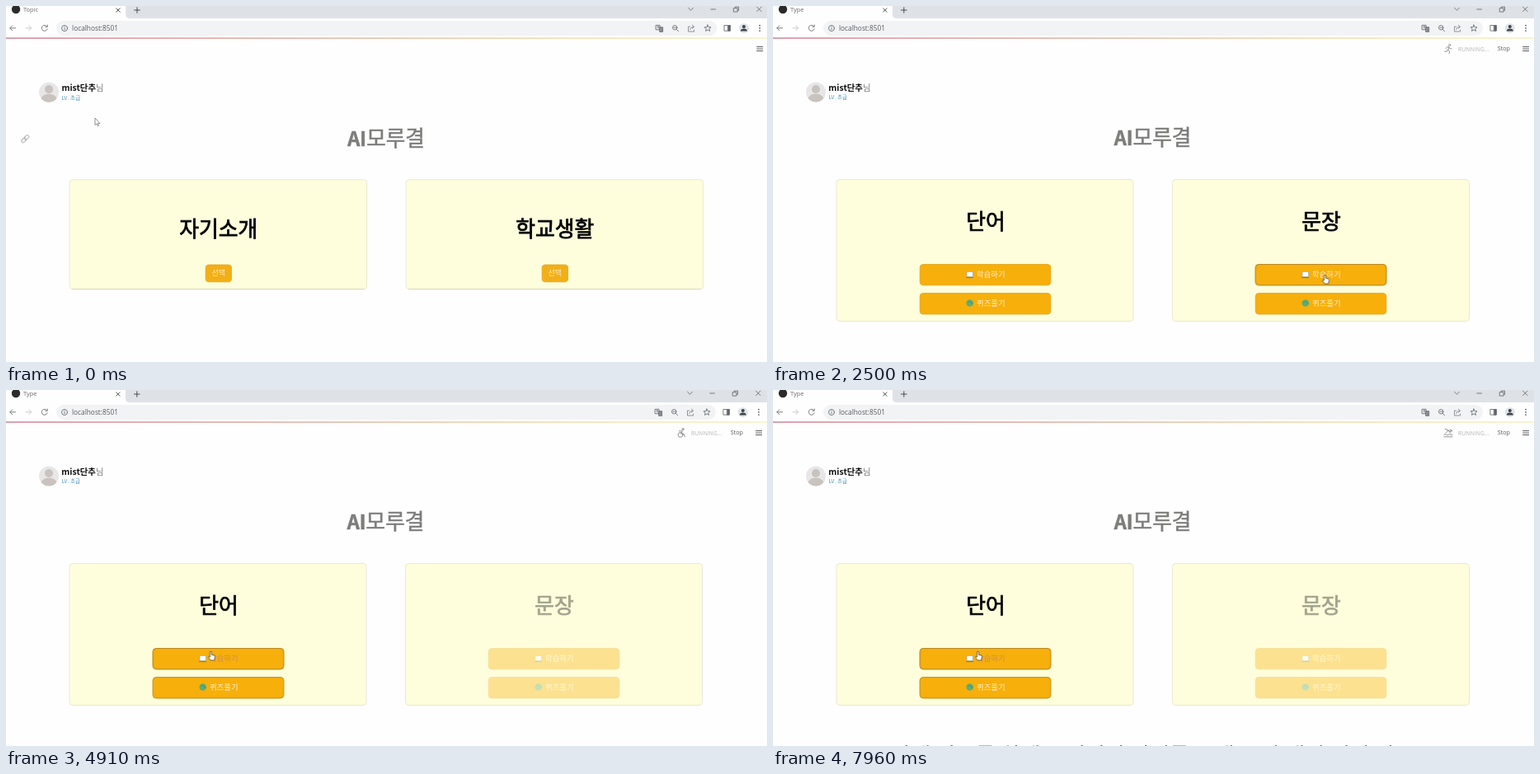
Write an HTML page that moves like this. It is 923 px wide and 432 px high and loops after 8 s.

```html
<!DOCTYPE html>
<html lang="ko">
<head>
<meta charset="utf-8">
<title>Topic</title>
<style>
html, body { margin: 0; width: 100%; height: 100%; overflow: hidden; background: #fefefe; }
svg { display: block; }
text { font-family: "Noto Sans CJK KR", "Noto Sans CJK", "Noto Sans", sans-serif; }
.ui { font-family: "Open Sans", "Noto Sans", sans-serif; }
.mid { text-anchor: middle; }
.head { font-size: 25.8px; text-anchor: middle; stroke: #000; stroke-width: .75; }
.line { fill: none; stroke: #6c7075; stroke-width: .9; stroke-linecap: round; stroke-linejoin: round; }
.card { fill: #fffedc; stroke: #e8e8d4; stroke-width: 1; }
.pick { fill: #f1af18; stroke: #e3a526; stroke-width: .8; }
.btn { fill: #f7af0b; stroke: #e2a31c; stroke-width: .8; }
.hover { fill: none; stroke: #b0842a; stroke-width: .9; }
.label { fill: currentColor; font-size: 9.4px; }
.light { color: #fff0cc; }

/* one loop = 8s, 1% = 80ms */
.t { animation: 8s linear infinite; }
.flip { animation-timing-function: step-end; }
#view { animation-name: settle; }
.topic { animation-name: topic; }
.type { animation-name: type; }
.tabA { animation-name: tabA; }
.tabB { animation-name: tabB; }
.link { animation-name: link; }
.run { animation-name: run; }
.overR { animation-name: overR; }
.overL { animation-name: overL; }
.busy { animation-name: busy; }
.press { animation-name: press; }
.stale { animation-name: stale; }
.next { animation-name: next; }
#cursor { animation-name: move; }
.arrow { animation-name: arrow; }
.hand { animation-name: hand; }
.reel { animation: reel 1.6s steps(8) infinite; }

@keyframes settle { 0% { transform: scale(1.0013); } 6.75%, 100% { transform: none; } }
@keyframes topic { 0% { opacity: 1; } 31.2%, 100% { opacity: 0; } }
@keyframes type { 0% { opacity: 0; } 31.2%, 100% { opacity: 1; } }
@keyframes tabA { 0% { opacity: 1; } 28%, 100% { opacity: 0; } }
@keyframes tabB { 0% { opacity: 0; } 28%, 100% { opacity: 1; } }
@keyframes link { 0% { opacity: 1; } 1.6%, 100% { opacity: 0; } }
@keyframes run { 0%, 38.1% { opacity: 0; } 23.75%, 55.4%, 100% { opacity: 1; } }
@keyframes overR { 0%, 40%, 100% { opacity: 0; } 23.1% { opacity: 1; } }
@keyframes overL { 0% { opacity: 0; } 42.5%, 100% { opacity: 1; } }
@keyframes busy { 0% { opacity: 0; } 56%, 100% { opacity: .7; } }
@keyframes press { 0%, 56% { color: #fff0cc; } 59%, 100% { color: #d08d48; } }
@keyframes stale { 0%, 56% { opacity: 1; } 60.5%, 100% { opacity: .36; } }
@keyframes next { 0% { opacity: 0; } 96.25%, 100% { opacity: 1; } }
@keyframes arrow { 0%, 40% { opacity: 1; } 23.1%, 42.5%, 100% { opacity: 0; } }
@keyframes hand { 0%, 40% { opacity: 0; } 23.1%, 42.5%, 100% { opacity: 1; } }
@keyframes reel { to { transform: translateX(-96px); } }
@keyframes move {
  0%, .75% { transform: translate(108px, 136px); }
  2.5%, 5.6% { transform: translate(708px, 203px); }
  9.25%, 10.8% { transform: translate(690px, 300px); }
  17.5%, 20.9% { transform: translate(618px, 311px); }
  23.75% { transform: translate(669.5px, 326px); }
  38% { transform: translate(669.5px, 326px); animation-timing-function: ease-in-out; }
  44.25%, 100% { transform: translate(248.5px, 317px); }
}
</style>
</head>
<body>
<svg width="923" height="432" viewBox="0 0 923 432">
  <defs>
    <linearGradient id="bar">
      <stop offset="0" stop-color="#c4647a"/>
      <stop offset=".4" stop-color="#dc9c88"/>
      <stop offset=".75" stop-color="#efd59a"/>
      <stop offset="1" stop-color="#f4ecb8"/>
    </linearGradient>
    <clipPath id="face"><circle cx="52" cy="104.5" r="12"/></clipPath>

    <g id="select">
      <rect class="pick" x="-15.7" y="313.6" width="31.4" height="20.8" rx="4"/>
      <text class="mid" y="326.3" font-size="9" fill="#fdeabb">선택</text>
    </g>
    <g id="learn">
      <rect class="btn" x="-79.3" y="313.5" width="158.6" height="25.3" rx="4"/>
      <path d="M-22.5 322.5h7.4v6h-7.4z" fill="#fff" stroke="#8ea3ad" stroke-width=".6"/>
      <path d="M-23.3 329.6h9" stroke="#6f7a80" stroke-width="1"/>
      <text class="label" x="-10.5" y="328.6">학습하기</text>
    </g>
    <g id="quiz">
      <rect class="btn" x="-79.3" y="348.5" width="158.6" height="25.5" rx="4"/>
      <circle cx="-18.8" cy="360.5" r="4.3" fill="#5fae72"/>
      <path d="M-21 359.5q2-2 4 0t1 2.6" fill="none" stroke="#3f8f86" stroke-width="1"/>
      <text class="label" x="-10.5" y="363.6">퀴즈풀기</text>
    </g>
    <rect id="ring" class="hover" x="-79.3" y="313.5" width="158.6" height="25.3" rx="4"/>

    <g id="wheel"><circle cx="8" cy="1.6" r="1.1"/><circle cx="5" cy="8.4" r="2.9"/><path d="M3.5 3.7 7.4 3.9 5.6 7H9l1.5 3.8"/></g>
    <g id="bike"><circle cx="7.6" cy="1.5" r="1.1"/><circle cx="3" cy="9" r="2.2"/><circle cx="9.2" cy="9" r="2.2"/><path d="M9.6 5.2H8L6.3 3.5 4.2 5.6 6.2 7V9.4"/></g>
    <g id="person"><circle cx="6" cy="1.4" r="1.1"/><path d="M1.4 4h9.2M4.8 4v7.5M7.2 4v7.5M4.8 7.5h2.4"/></g>
    <g id="runner"><circle cx="7.6" cy="1.5" r="1.1"/><path d="M3 5.4 5.2 3.6 7 4 5.6 7.2 7.6 8.8 7.2 11.5M5.6 7.2 4.4 9.2 1.6 9.2M7 4 8.2 5.8H10.2"/></g>
    <g id="swim"><circle cx="9" cy="3.4" r="1.2"/><path d="M2.4 1.4 6 2.8 3.2 6.2M6 2.8 8.6 6.4M.8 8.2q1.3-1 2.6 0t2.6 0 2.6 0 2.6 0M.8 10.8h10.4"/></g>
  </defs>

  <rect width="923" height="432" fill="#fefefe"/>
  <g id="view" class="t flip">
    <!-- tab strip -->
    <path d="M923 0V15H150q-5 0-5-5V0z" fill="#dee1e6"/>
    <circle cx="12" cy="4" r="5.2" fill="#2b2b2b"/>
    <g font-size="7.4" fill="#6a6a6a">
      <text class="ui t flip tabA" x="21" y="7.4">Topic</text>
      <text class="ui t flip tabB" x="21" y="7.4">Type</text>
    </g>
    <g class="line">
      <path d="M133.6 2.8l4.4 4.4m0-4.4-4.4 4.4M155.5 5h6.6M158.8 1.7v6.6" stroke="#3c4043"/>
      <path d="M826.5 2.2l3 3 3-3M853.8 4h5.6M909.6 1.2l5.4 5.4m0-5.4-5.4 5.4"/>
      <path d="M881.6 2.7h4.4v4.4h-4.4zM883.2 2.4V1.1h4.3v4.4h-1.2"/>
    </g>

    <!-- toolbar -->
    <rect x="61" y="18" width="800" height="18" rx="9" fill="#f1f3f4"/>
    <g class="line">
      <path d="M11.5 26.8H4.8m3-3-3 3 3 3"/>
      <path d="M24 26.8h6.7m-3-3 3 3-3 3" stroke="#c4c6c9"/>
      <path d="M49.6 24.7a3.5 3.5 0 1 0 .5 3.2M50.2 23v2.3h-2.4"/>
      <circle cx="71" cy="27" r="3.5"/>
      <path d="M71 26.7v1.9M71 25v.1"/>
      <path d="M787.5 23.3h4.6v5.4h-4.6zM789 25h1.8m-.9 0v2"/>
      <path d="M792 25.700h3.600v5.600h-3.600z" fill="#8a8e92"/>
      <circle cx="810.2" cy="26.2" r="2.7"/><path d="M812.3 28.4l2.3 2.3M809 26.2h2.4"/>
      <path d="M828.5 25h-2v6h7v-2M828.6 28.5q.6-3.2 4-3.3M831.3 23.2l2.4 2-2.4 2" stroke="#85898e"/>
      <path d="M850 23l1.1 2.6 2.9.2-2.2 1.8.7 2.8-2.5-1.5-2.5 1.5.7-2.8-2.2-1.8 2.9-.2z"/>
      <path d="M870.3 23.5h7v6.6h-7z"/><path d="M874.7 23.5h2.6v6.6h-2.6z" fill="#5f6368"/>
    </g>
    <text class="ui" x="80" y="29.8" font-size="8.3" fill="#5a5d61">localhost:8501</text>
    <circle cx="893.8" cy="27" r="6" fill="#dfe3ea"/>
    <circle cx="893.8" cy="25" r="2" fill="#3f4347"/>
    <path d="M889.8 30.5q0-3 4-3t4 3z" fill="#3f4347"/>
    <g fill="#5f6368"><circle cx="913" cy="23.7" r=".9"/><circle cx="913" cy="26.9" r=".9"/><circle cx="913" cy="30.1" r=".9"/></g>
    <rect y="38.4" width="923" height="1.2" fill="url(#bar)"/>

    <!-- page header -->
    <path d="M909.2 49.5h7.8m-7.8 2.5h7.8m-7.8 2.5h7.8" stroke="#5c5e65" stroke-width="1"/>
    <g class="t flip run">
      <svg x="813" y="46" width="12" height="12">
        <g class="reel line" style="stroke:#85868a">
          <use href="#wheel"/>
          <use href="#bike" x="12"/>
          <use href="#person" x="24"/>
          <use href="#swim" x="36"/>
          <use href="#runner" x="48"/>
          <use href="#bike" x="60"/>
          <use href="#person" x="72"/>
          <use href="#swim" x="84"/>
        </g>
      </svg>
      <text class="ui" x="831" y="54.6" font-size="6.9" fill="#b4b5b9">RUNNING...</text>
      <text class="ui" x="878.7" y="54.4" font-size="7.2" fill="#55575f">Stop</text>
    </g>
    <circle cx="52" cy="104.5" r="12" fill="#e8e6e6"/>
    <g clip-path="url(#face)" fill="#c8c3bf">
      <circle cx="52" cy="101" r="5"/>
      <ellipse cx="52" cy="114" rx="10" ry="7.5"/>
    </g>
    <text x="67.3" y="103.3" font-size="10.4" fill="#777"><tspan font-weight="700" fill="#111">mist단추</tspan>님</text>
    <text x="67.5" y="113.4" font-size="6.6" fill="#4f93ba">LV. 초급</text>
    <g class="line t flip link" style="stroke:#9c9ca2">
      <rect x="-5.6" y="-2" width="6.6" height="4" rx="2" transform="translate(23.2 161) rotate(-45)"/>
      <rect x="-1" y="-2" width="6.6" height="4" rx="2" transform="translate(23.2 161) rotate(-45)"/>
    </g>
    <text class="mid" x="460.5" y="169.4" font-size="25.6" fill="#7d7d7b" stroke="#7d7d7b" stroke-width=".6"><tspan font-size="23.5" font-weight="700">AI</tspan>모루결</text>

    <!-- topic page -->
    <g class="t flip topic">
      <rect class="card" x="77" y="210.5" width="360" height="132.5" rx="4"/>
      <rect class="card" x="484.5" y="210.5" width="360" height="132.5" rx="4"/>
      <path d="M80 343.2h354M487.5 343.2h354" stroke="#d2d2bc" stroke-width=".8"/>
      <text class="head" x="257.5" y="279.8">자기소개</text>
      <text class="head" x="665" y="279.8">학교생활</text>
      <use href="#select" x="257.5"/>
      <use href="#select" x="665"/>
      <rect class="hover t flip overR" x="649.3" y="313.6" width="31.4" height="20.8" rx="4"/>
    </g>

    <!-- type page -->
    <g class="t flip type">
      <rect class="card" x="77" y="210.5" width="360" height="172" rx="4"/>
      <rect class="card" x="484.5" y="210.5" width="360" height="172" rx="4"/>
      <text class="head" x="258" y="271.2">단어</text>
      <use class="t press" href="#learn" x="257.5"/>
      <use class="light" href="#quiz" x="257.5"/>
      <use class="t flip overL" href="#ring" x="257.5"/>
      <use class="t flip busy" href="#ring" x="257.5" y="35.1"/>
      <g class="light t stale">
        <text class="head" x="665" y="271.2">문장</text>
        <use href="#learn" x="664.5"/>
        <use href="#quiz" x="664.5"/>
      </g>
      <use class="t flip overR" href="#ring" x="664.5"/>
    </g>
    <text class="mid t flip next" x="461" y="453.4" font-size="25.8" fill="#77777c">아래 카드를 차례로 넘기며 단어를 크게 소리 내어 읽어 봐요</text>
  </g>

  <g id="cursor" class="t" stroke-linejoin="round">
    <path class="t flip arrow" d="M0 0V8.5L2 6.8 3.4 9.8 4.6 9.2 3.3 6.4H6z" fill="#fff" stroke="#777" stroke-width=".8"/>
    <path class="t flip hand" d="M-1 .8Q0-.6 1 .8V4.3L4.3 5.2Q5.2 5.6 5 6.8L4.2 11H-.6L-3 7.3Q-3.2 6-1 7z" fill="#fff" stroke="#444" stroke-width=".8"/>
  </g>
</svg>
</body>
</html>
```
